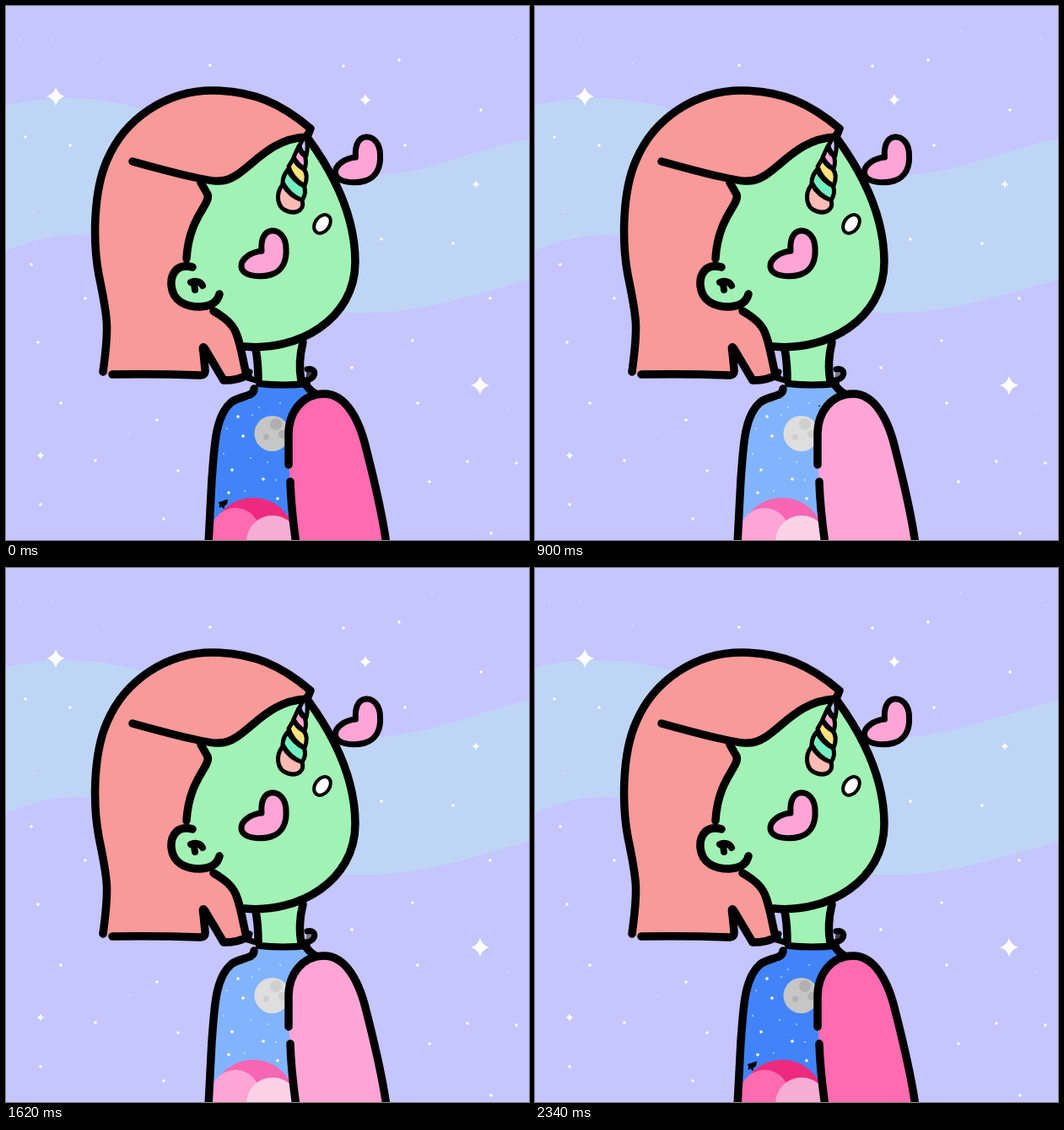
An HTML page for the animation above (2370 ms loop, 620x632 px).

```html
<!DOCTYPE html>
<html lang="en">
<head>
<meta charset="utf-8">
<title>Space sweater</title>
<style>
html, body { margin: 0; width: 100%; height: 100%; overflow: hidden; background: #c5c5ff; }
svg {
  display: block; width: 100vw; height: 100vh;
  --sky: #4184fa; --sleeve: #ff6bb0; --planet: #ee2a7e; --pale: #f6add4;
  --moon: #c6c6c6; --crater: #b0b0b0; --collar: #3d3c4c;
}
svg.lit {
  --sky: #82b4fd; --sleeve: #ffa5d6; --planet: #f766b3; --pale: #fad1e7;
  --moon: #dedede; --crater: #cfcfcf; --collar: #777783;
}
.line { fill: none; stroke: #000; stroke-width: 9.5; stroke-linecap: round; stroke-linejoin: round; }
.skin { fill: #a1f2b4; }
.hair { fill: #f79a99; }
.star { fill: #fff; }
</style>
</head>
<body>
<svg id="art" viewBox="0 0 620 632" preserveAspectRatio="none">
  <defs>
    <clipPath id="torso"><path id="body" d="M296 449C294 463 280 461 267 469C247 486 246 525 244 560L240 632H346L338 545V500L365 462L355 449Z"/></clipPath>
    <path id="heart" d="M303 290C291 291 278 299 279 309C281 321 303 321 314 318C328 314 333 301 332 287C332 274 324 265 315 266C305 267 302 278 303 290Z" fill="#ffa5d6" stroke="#000" stroke-width="7" stroke-linejoin="round"/>
  </defs>

  <rect width="620" height="632" fill="#c5c5ff"/>
  <path fill="#bfd5f5" d="M0 118C50 105 110 106 160 122C260 150 330 206 440 200C510 195 550 172 620 157V324C560 338 500 366 405 363C300 360 220 275 105 272C60 268 30 277 0 290Z"/>
  <g id="stars" class="star"></g>

  <g clip-path="url(#torso)">
    <use href="#body" fill="var(--sky)"/>
    <g id="specks" class="star"></g>
    <circle cx="315.500" cy="506" r="21" fill="var(--moon)"/>
    <g fill="var(--crater)">
      <circle cx="320" cy="495" r="7"/><circle cx="308.500" cy="510" r="3.500"/><circle cx="328" cy="507" r="5"/>
    </g>
    <circle cx="293" cy="632" r="50" fill="var(--planet)"/>
    <circle cx="272" cy="623" r="29" fill="var(--sleeve)"/>
    <circle cx="316" cy="634" r="31" fill="var(--pale)"/>
    <path id="rocket" d="M5-5L4 0L1 2L1 5L-1 4L-2 2L-4 4L-4 0L-5-2L-1-3L1-4Z" stroke="#000" stroke-linejoin="round"/>
  </g>

  <g class="line">
    <path fill="var(--collar)" stroke-width="7" d="M357 430C369 427 369 442 355 443"/>
    <path fill="var(--collar)" stroke-width="7" d="M289 433L286 440L296 443"/>
    <path class="skin" stroke="none" d="M296 400L301 448H351L349 396Z"/>
    <path d="M296 406Q299 422 299 443M352 398Q346 422 350 444"/>
    <path stroke-width="8" d="M300 447Q329 450 357 447"/>
    <path d="M294 453C294 463 277 461 267 469C247 486 247 525 244 560L240 637M356 449Q361 456 369 460"/>
    <path stroke="none" fill="var(--sleeve)" d="M335 543V510C334 480 352 459 377 459C403 459 419 490 427 524C438 567 446 600 451 632H343L337 563Z"/>
    <path d="M335 543V510C334 480 352 459 377 459C403 459 419 490 427 524C438 567 446 600 451 637M337 563Q338 595 344 637"/>
  </g>

  <path class="skin" d="M355 148C389 196 414 250 414 303C414 371 346 409 283 403L240 360L205 300L225 205L290 170Z"/>
  <path class="line" d="M359 158C391 202 414 250 414 303C414 371 346 409 283 403"/>

  <path class="hair" d="M114 433C123 375 120 368 110 318C103 280 103 220 120 182C141 133 190 100 245 100C293 100 327 116 361 145L356 156C303 157 286 205 253 207L232 209L240 227C235 244 217 261 214 300L246 361C275 378 276 389 287 440L257 443L235 406L234 437H124Z"/>
  <g class="line">
    <path d="M115 433C123 375 120 368 110 318C103 280 103 220 120 182C141 133 190 100 245 100C293 100 327 116 361 145L357 155C303 157 284 207 253 207Q240 209 150 184"/>
    <path d="M231 209L239 223C243 235 217 249 214 299"/>
    <path class="skin" d="M221 309C203 304 195 317 196 331C198 350 214 356 230 356C244 355 251 350 253 341"/>
    <path stroke-width="8" d="M219 327C225 324 231 327 233 331M223 329L224 336"/>
    <path d="M246 361C276 378 274 387 285 437Q276 443 258 443L236 406Q232 400 234 410L236 430Q237 438 229 437Q180 435 126 436"/>
  </g>

  <g stroke="#000" stroke-width="5" stroke-linejoin="round" stroke-linecap="round">
    <path fill="#c5c5ff" d="M355 152L348 165Q349 172 356 177Q359 164 355 152Z"/>
    <path fill="#ffa5d6" d="M347 166L341 179Q346 188 354 193Q357 184 354 177Q349 175 347 166Z"/>
    <path fill="#ffe27c" d="M341 180L335 190Q339 204 354 213Q359 200 353 193Q344 188 341 180Z"/>
    <path fill="#74f0c0" d="M334 194Q328 201 328 209Q336 224 351 230Q357 220 353 213Q341 207 334 194Z"/>
    <path fill="#ffbab4" d="M328 211C319 223 321 239 334 243C347 247 354 239 351 230Q336 225 328 211Z"/>
  </g>

  <use href="#heart"/>
  <use href="#heart" x="111.500" y="-111"/>
  <ellipse cx="375" cy="258" rx="8.500" ry="12" transform="rotate(36 375 258)" fill="#fff" stroke="#000" stroke-width="4"/>
</svg>
<script>
const art = document.getElementById('art');
const rocket = document.getElementById('rocket');

const dot = r => p => {
  const [x, y] = p.split(',');
  return `<circle cx="${x}" cy="${y}" r="${r}"/>`;
};
const spark = (x, y, r) => {
  const q = r * .22;
  return `<path d="M${x} ${y - r}Q${x + q} ${y - q} ${x + r} ${y}Q${x + q} ${y + q} ${x} ${y + r}Q${x - q} ${y + q} ${x - r} ${y}Q${x - q} ${y - q} ${x} ${y - r}Z"/>`;
};
const dots = (list, r) => list.split(' ').map(dot(r)).join('');

document.getElementById('stars').innerHTML =
  dots('242,70 466,64 400,71 563,123 23,155 76,165 473,165 30,306 94,346 38,398 122,400 65,470 179,490 204,550 41,590 187,607 106,538 445,276 530,281 574,346 410,428 482,396 488,470 547,539 605,541 502,563 575,624', 1.8) +
  dots('116,68 17,40 54,40 505,30 600,38 33,243 146,506 595,478', .7) +
  spark(59, 107, 11) + spark(426, 111, 7) + spark(562, 449, 11) + spark(557, 211, 4.5) + spark(41, 532, 4.5);
document.getElementById('specks').innerHTML =
  dots('275,486 281,509 268,549 305,560 322,583 264,576', 1.8) +
  dots('288,465 300,475 262,500 290,535 310,540 325,470 258,530 320,561 283,574 292,484', .8);

const LOOP = 2370, STEP = 30, REACH = 147.7;
const flips = [210, 450, 690, 930, 1170, 1410, 1620, 1890, 2130, 2340];

// Distance flown along the straight path: speeds up, then slows towards the moon
const flown = t => t < 0
  ? 42 * ((1 + t / 400) ** 2 - 1)
  : REACH * (1 - (1 - t / 1080) ** 1.7);

function draw(now) {
  const t = Math.floor(now % LOOP / STEP) * STEP;
  art.classList.toggle('lit', flips.filter(f => f <= t).length % 2 === 1);

  const flight = t > 1500 ? t - 2340 : t;
  const visible = flight > -400 && flight < 1050;
  rocket.style.display = visible ? '' : 'none';
  if (visible) {
    const s = flown(flight);
    const size = s < 0 ? 1 : 1 - (s / REACH) ** 4;
    rocket.setAttribute('transform', `translate(${257.5 + .565 * s} ${589.5 - .825 * s}) scale(${size})`);
  }
}

const start = performance.now();
function tick() {
  draw(performance.now() - start);
  requestAnimationFrame(tick);
}
tick();
</script>
</body>
</html>
```
